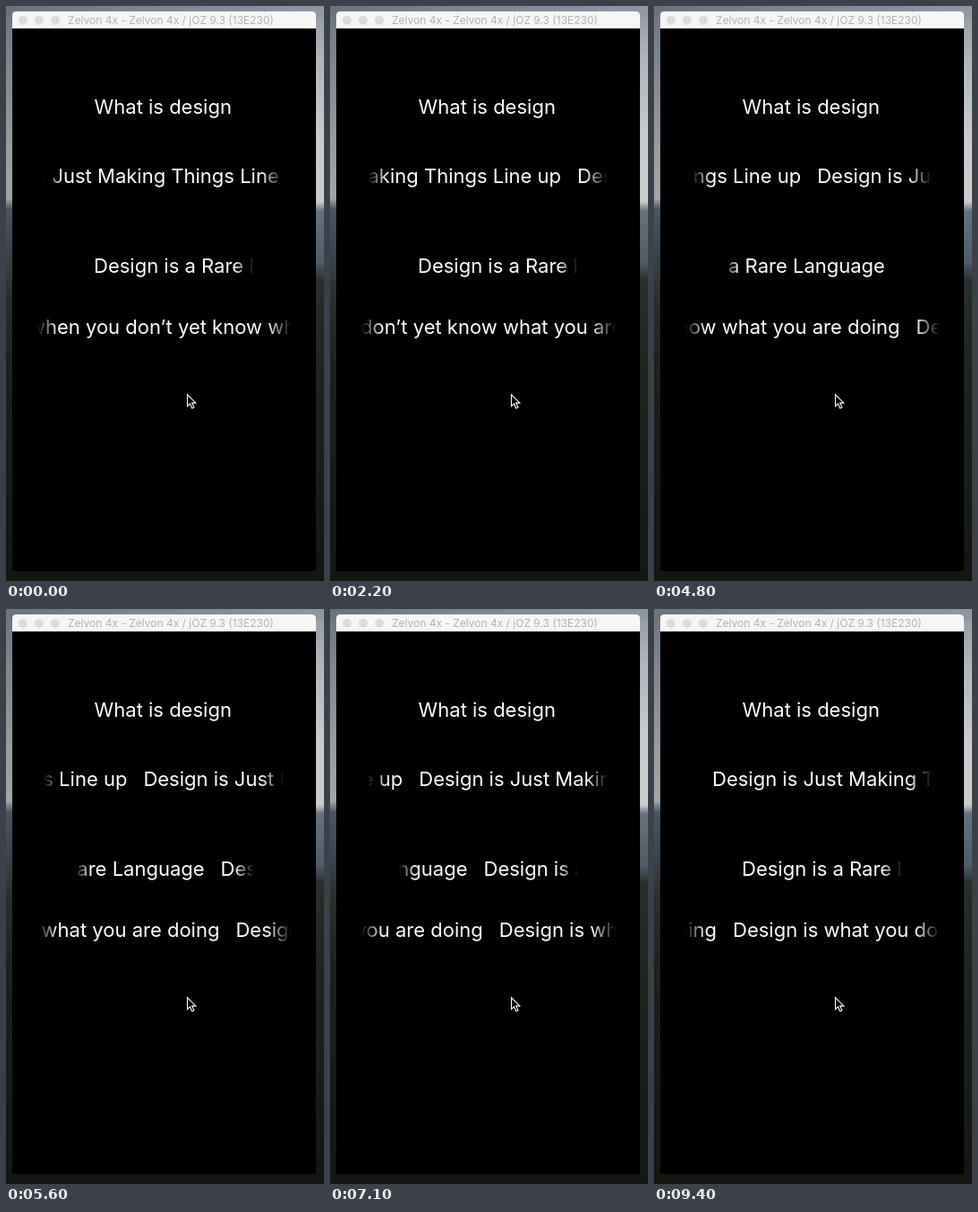
An HTML page for the animation above (9.5 s loop, 355x640 px).

```html
<!DOCTYPE html>
<html lang="en">
<head>
<meta charset="utf-8">
<title>Marquee labels</title>
<style>
  html, body { margin: 0; width: 100%; height: 100%; overflow: hidden; background: #131611; }
  #stage {
    position: relative; width: 355px; height: 640px; overflow: hidden;
    font-family: Inter, "Open Sans", sans-serif; font-optical-sizing: none;
    background: #131611;
  }
  .strip { position: absolute; top: 0; height: 640px; }
  .strip.l {
    left: 0; width: 8px;
    background: linear-gradient(#6a727b, #7d858d 60px, #969ba0 150px, #a3a6a9 214px,
      #4a5560 226px, #3c4650 270px, #2a312f 318px, #1c221c 400px, #131611 640px);
  }
  .strip.r {
    left: 345px; width: 10px;
    background: linear-gradient(#8f98a2, #b0b5ba 60px, #c6c8ca 140px, #cbcbcb 218px,
      #667180 228px, #4f5b69 285px, #29302c 305px, #1d231e 420px, #131611 640px);
  }
  .sky {
    position: absolute; left: 0; top: 0; width: 355px; height: 12px;
    background: linear-gradient(90deg, #6a727b, #7d868f 40%, #868f99 75%, #8f98a2);
  }
  .window {
    position: absolute; left: 7px; top: 6px; width: 339px; height: 623px;
    border-radius: 4px 4px 0 0; background: #000; overflow: hidden;
  }
  .bar {
    height: 19px; background: #f6f6f6; color: #b3b3b3;
    font-size: 12px; line-height: 20px; white-space: pre; text-indent: 62px;
  }
  .bar i {
    position: absolute; top: 5px; width: 10px; height: 10px;
    border-radius: 50%; background: #dcdcdc;
  }
  .line {
    position: absolute; height: 40px; overflow: hidden;
    color: #fff; font-size: 22px; line-height: 40px; white-space: pre;
  }
  .head { position: absolute; left: 0; top: 0; }
  .tail { position: absolute; right: 100%; top: 0; margin-right: 18px; }
  svg { position: absolute; left: 0; top: 0; }
</style>
</head>
<body>
<div id="stage">
  <div class="strip l"></div>
  <div class="strip r"></div>
  <div class="sky"></div>
  <div class="window">
    <div class="bar"><i style="left:7px"></i><i style="left:25px"></i><i style="left:43px"></i>Zelvon 4x - Zelvon 4x / jOZ 9.3 (13E230)</div>
  </div>
  <div class="line" style="left:98.6px; top:92px">What is design</div>
  <svg width="355" height="640">
    <path d="M202.5 432.5v13l3-2.8 2.2 5 2.2-1-2.2-4.8h4.2z" fill="#000" stroke="#fff" stroke-width="1.1"/>
  </svg>
</div>
<script>
  const LOOP = 9500, STEP = 100;

  // y: centre line; box: left and right edge; fade: width at each edge
  // keys: [ms, x of the leading copy]; home: resting x
  const labels = [
    { text: "Design is Just Making Things Line up",
      y: 189, box: [42, 310], fade: [22, 25], home: 65,
      keys: [[0, 355.4], [8050, 65]] },
    { text: "Design is a Rare Language",
      y: 289, box: [77, 277], fade: [18, 22], home: 98,
      keys: [[2220, 393], [8720, 98]] },
    { text: "Design is what you do when you don’t yet know what you are doing",
      y: 357, box: [35, 319], fade: [23, 27], home: 88,
      keys: [[0, 509], [7900, 152.7], [9500, 83.7]] }
  ];

  const stage = document.getElementById("stage");

  function add(parent, cls, text) {
    const el = document.createElement("div");
    el.className = cls;
    el.textContent = text;
    return parent.appendChild(el);
  }

  for (const l of labels) {
    const [left, right] = l.box, [a, b] = l.fade;
    const line = add(stage, "line", "");
    const mask = `linear-gradient(90deg, transparent, #000 ${a}px, #000 calc(100% - ${b}px), transparent)`;
    Object.assign(line.style, {
      left: left + "px", top: l.y - 20 + "px", width: right - left + "px",
      webkitMaskImage: mask, maskImage: mask
    });
    l.head = add(line, "head", l.text);
    l.tail = add(l.head, "tail", l.text);
  }

  // Linear position between keys, or null while resting
  function position(keys, t) {
    for (let i = 1; i < keys.length; i++) {
      const [t0, x0] = keys[i - 1], [t1, x1] = keys[i];
      if (t >= t0 && t < t1) return x0 + (x1 - x0) * (t - t0) / (t1 - t0);
    }
    return null;
  }

  function draw(now) {
    const t = Math.floor(now % LOOP / STEP) * STEP;
    for (const l of labels) {
      const x = position(l.keys, t);
      l.head.style.transform = `translateX(${(x ?? l.home) - l.box[0]}px)`;
      l.tail.style.visibility = x === null ? "hidden" : "visible";
    }
  }

  const start = performance.now();
  function tick() {
    draw(performance.now() - start);
    requestAnimationFrame(tick);
  }
  tick();
</script>
</body>
</html>
```
